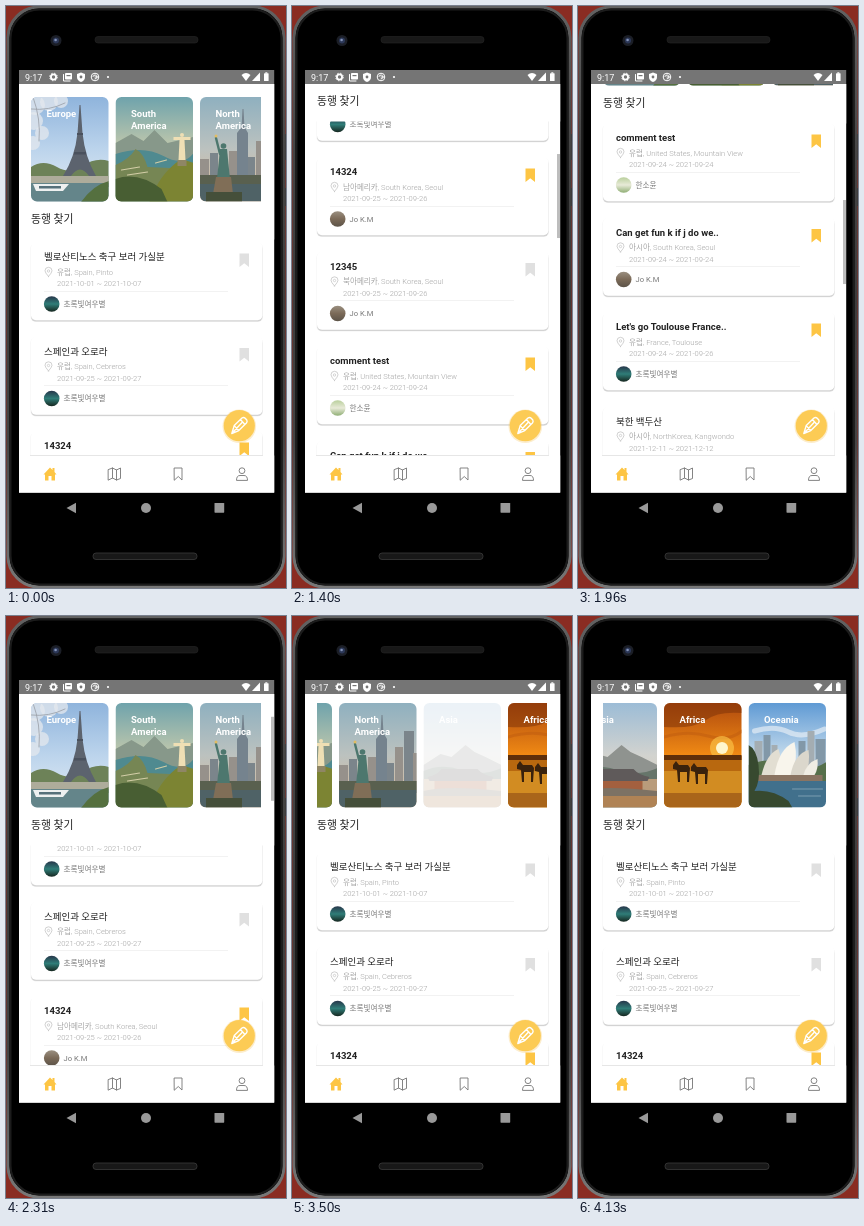
Animation of 280x582 px, one loop 4970 ms. Source, as an HTML page:

```html
<!DOCTYPE html>
<html lang="ko">
<head>
<meta charset="utf-8">
<style>
html, body { margin: 0; width: 100%; height: 100%; overflow: hidden; background: #8a2c22; }
svg { display: block; }
text { font-family: Roboto, "Noto Sans CJK KR", sans-serif; white-space: pre; }
</style>
</head>
<body>
<svg id="stage" width="280" height="582" viewBox="0 0 280 582"></svg>
<script>
const PITCH = 94.5, CARD_STEP = 84.5, LOOP = 4970, TICK = 70;

const text = (x, mid, size, fill, str, extra = '') =>
  `<text x="${x}" y="${mid + size * 0.36}" font-size="${size}" fill="${fill}" ${extra}>${str}</text>`;
const rect = (x, y, w, h, fill, extra = '') =>
  `<rect x="${x}" y="${y}" width="${w}" height="${h}" fill="${fill}" ${extra}/>`;
const circle = (x, y, r, fill, extra = '') =>
  `<circle cx="${x}" cy="${y}" r="${r}" fill="${fill}" ${extra}/>`;
const path = (d, fill, extra = '') => `<path d="${d}" fill="${fill}" ${extra}/>`;
const line = (d, color, width = 1, extra = '') =>
  path(d, 'none', `stroke="${color}" stroke-width="${width}" stroke-linejoin="round" stroke-linecap="round" ${extra}`);
const grad = (id, ...stops) => `<linearGradient id="${id}" x2="0" y2="1">` + stops.map((c, i) =>
  `<stop offset="${i / (stops.length - 1)}" stop-color="${c}"/>`).join('') + '</linearGradient>';
const full = fill => rect(0, 0, 78, 105, fill);

const defs = `<defs>
  <clipPath id="photo"><rect width="77.5" height="104.5" rx="6"/></clipPath>
  ${grad('rim', '#626262', '#444', '#3c3c3c', '#444', '#787878')}
  ${grad('skyEurope', '#8fb4dc', '#bcd4ec', '#e6edf4')}
  ${grad('skySouth', '#6fa3ac', '#c3c9ac', '#e0cd8f')}
  ${grad('skyNorth', '#8fb0bf', '#bcc2bf', '#dcb994')}
  ${grad('skyAsia', '#9cbcd6', '#d2d3cf', '#dccbb4')}
  ${grad('skyAfrica', '#b04a0e', '#f08a14', '#f4a325')}
  ${grad('skyOceania', '#5f9ad4', '#c3daec', '#dbe6ec')}
  ${grad('user0', '#27364a', '#2f7d78', '#16261f')}
  ${grad('user1', '#9a8f80', '#7b6a58', '#5c5348')}
  ${grad('user2', '#b9cf9c', '#e8ead8', '#8fae74')}
</defs>`;

const places = [
  ['Europe', full('url(#skyEurope)') +
    [[4, 8, 10], [18, 5, 9], [3, 24, 9], [30, 4, 7], [11, 36, 7], [2, 46, 7]].map(([x, y, r]) =>
      circle(x, y, r, '#e4e8ee', 'opacity=".75"')).join('') +
    line('M0 12Q18 14 34 6M2 0Q10 22 8 44', '#9a9fa6', 0.8) +
    path('M0 70Q12 62 26 70T52 69T78 64V90H0Z', '#6d8258') +
    path('M48.5 8H49.5L51.5 36Q54 60 65 79H58Q49 66 40 79H32Q44 60 46.5 36Z', '#5c636e') +
    rect(43, 55, 12, 2.5, '#4a515d') + rect(46, 36, 6, 2, '#4a515d') +
    rect(0, 79, 78, 7, '#aeac9b') + rect(0, 86, 78, 19, '#64858a') +
    path('M2 87H38L32 94H5Z', '#eef0f0') + rect(8, 89, 22, 2.5, '#56707a') +
    path('M78 84Q62 88 50 105H78Z', '#55703f')],
  ['South<tspan x="15.5" dy="12">America</tspan>', full('url(#skySouth)') +
    path('M0 46L16 37 28 44 39 33 52 46 78 40V105H0Z', '#87988a') +
    path('M0 57Q28 48 48 59T78 56V105H0Z', '#4f8a90') +
    path('M0 68Q14 62 20 52Q28 56 32 70L78 72V105H0Z', '#768654') +
    path('M34 105Q44 76 66 62L78 66V105Z', '#7c8433') + path('M0 82Q22 74 46 92L52 105H0Z', '#485e33') +
    line('M6 73L24 70M12 78L32 75M40 66L51 63', '#d2cda6', 1.2) +
    path('M58 40H75V43H69L70 63H63L64 43H58Z', '#efdfb4') + circle(66.5, 38, 2, '#efdfb4') +
    rect(62, 63, 9, 6, '#8f8665')],
  ['North<tspan x="15.5" dy="12">America</tspan>', full('url(#skyNorth)') +
    [[0, 62, 9], [10, 56, 8], [29, 54, 8], [47, 60, 8], [56, 44, 8], [65, 28, 10], [74, 50, 5]].map(([x, y, w], i) =>
      rect(x, y, w, 90 - y, i % 2 ? '#7b858b' : '#96918b')).join('') +
    path('M42.5 12H43.5L44.5 30 48 36V88H37V36L41.5 30Z', '#75838e') +
    rect(0, 78, 78, 9, '#59604f') + rect(0, 87, 78, 18, '#4f6266') +
    path('M20 52H27L30 82H17Z', '#4d776e') + circle(23.5, 49, 2.8, '#4d776e') +
    line('M20 57L16 41', '#4d776e', 2.4) + circle(16, 39, 1.5, '#e2bd62') +
    path('M16 80H31L33 97H13Z', '#806e57') + rect(6, 95, 36, 10, '#454f3a')],
  ['Asia', full('url(#skyAsia)') +
    path('M0 62L17 51 28 54 42 42 51 49 62 54 78 62V105H0Z', '#8f938f') +
    path('M0 68Q18 60 38 67T78 65V105H0Z', '#66756a') +
    rect(0, 76, 78, 29, '#b99c7b') +
    path('M4 74Q14 72 18 66H54Q59 72 70 74L68 78H6Z', '#5f5a5a') + rect(11, 78, 52, 10, '#a3603f') +
    path('M0 88Q24 82 78 88V93H0Z', '#7d7264') + rect(0, 93, 78, 12, '#b08355')],
  ['Africa', full('url(#skyAfrica)') +
    path('M0 0H78V10Q54 8 42 17T0 24Z', '#7a3008', 'opacity=".5"') +
    line('M0 34Q24 27 44 33T78 28', '#c4600f', 3, 'opacity=".6"') +
    circle(58, 45, 12, '#ffcb4e', 'opacity=".6"') + circle(58, 45, 6, '#fff6cc') +
    rect(0, 53, 78, 52, '#b8680f') + rect(0, 52, 78, 5, '#5e2f0a') +
    rect(0, 68, 78, 22, '#d28c22') + rect(0, 90, 78, 15, '#a9651a') +
    [[9, 60], [27, 62]].map(([x, y]) =>
      path(`M${x} ${y + 2}l3 -4 3 4h9l2 3 -1 14h-2v-10h-7v10h-2l-1 -12 -4 -1z`, '#3a220c')).join('')],
  ['Oceania', full('url(#skyOceania)') +
    line('M6 28Q26 22 40 29T76 26', '#f2f6f9', 5, 'opacity=".6"') +
    [[6, 38, 8], [15, 32, 7], [23, 42, 6], [50, 38, 7], [59, 28, 7], [67, 36, 10]].map(([x, y, w], i) =>
      rect(x, y, w, 76 - y, i % 2 ? '#8298a8' : '#a4adb2')).join('') +
    path('M0 62Q20 53 40 62T78 59V78H0Z', '#56704b') +
    path('M13 72Q18 51 30 46Q34 57 30 72Z', '#e2ded2') +
    path('M26 72Q30 46 46 39Q50 57 43 72Z', '#f8f5ec') +
    path('M42 72Q46 51 60 47Q62 60 57 72Z', '#dbd7cc') +
    path('M55 72Q58 60 69 56Q70 66 66 72Z', '#f0ede4') +
    rect(8, 72, 66, 6, '#8a7462') + rect(0, 78, 78, 27, '#41708c') +
    path('M0 42Q8 46 10 62T6 88Q24 86 40 98L44 105H0Z', '#37492f') + line('M44 86H74M50 93H72', '#7a9db0', 1)]
];

const users = ['초록빛여우별', 'Jo K.M', '한소윤'];
// title, place, from, to (month-day), user, bookmarked
const trips = [
  ['벨로산티노스 축구 보러 가실분', '유럽, Spain, Pinto', '10-01', '10-07', 0, 0],
  ['스페인과 오로라', '유럽, Spain, Cebreros', '09-25', '09-27', 0, 0],
  ['14324', '남아메리카, South Korea, Seoul', '09-25', '09-26', 1, 1],
  ['12345', '북아메리카, South Korea, Seoul', '09-25', '09-26', 1, 0],
  ['comment test', '유럽, United States, Mountain View', '09-24', '09-24', 2, 1],
  ['Can get fun k if j do we..', '아시아, South Korea, Seoul', '09-24', '09-24', 1, 1],
  ["Let's go Toulouse France..", '유럽, France, Toulouse', '09-24', '09-26', 0, 1],
  ['북한 백두산', '아시아, NorthKorea, Kangwondo', '12-11', '12-12', 0, 1]
];

const tripCard = ([title, place, from, to, user, saved], i) => `<g transform="translate(0 ${i * PITCH})">
  ${rect(24.5, 237, 232.5, 79, '#000', 'rx="5" opacity=".05"')}
  ${rect(25, 238, 231.5, 77.6, '#000', 'rx="5" opacity=".13"')}
  ${rect(25, 236, 231.5, 78.3, '#fff', 'rx="5"')}
  ${text(38, 251, 9.5, '#222', title, `font-weight="${/[가-힣]/.test(title) ? 500 : 700}"`)}
  ${line('M42.5 270.5Q39 266.5 39 264.8A3.5 3.5 0 0 1 46 264.8Q46 266.5 42.5 270.5Z', '#bdbdbd', 0.7)}
  ${circle(42.5, 265, 1.2, 'none', 'stroke="#bdbdbd" stroke-width=".6"')}
  ${text(51, 266, 7.55, '#a4a4a4', place, 'font-weight="300"')}
  ${text(51, 277.5, 7.55, '#a4a4a4', `2021-${from} ~ 2021-${to}`, 'font-weight="300"')}
  ${rect(38, 285, 184, 0.5, '#e4e4e4')}
  ${circle(45.7, 298, 7.8, `url(#user${user})`)}
  ${text(57.5, 298, 7.6, '#777', users[user])}
  ${path('M233.5 247.5h9.5v13.5l-4.75 -3.8l-4.75 3.8z', saved ? '#fdc544' : '#e0e0e0')}
</g>`;

const photoCard = ([name, scene], i) => `<g class="photo" transform="translate(${i * CARD_STEP} 0)">
  <g clip-path="url(#photo)">${scene}</g>
  ${text(15.5, 17, 9.5, '#fff', name, 'font-weight="700"')}
</g>`;

const phone =
  rect(0, 0, 280, 582, '#8a2c22') +
  rect(276, 128, 4, 26, '#3a3535') + rect(276, 182, 4, 18, '#3a3535') +
  rect(2, 1, 276, 580, '#000', 'rx="31" stroke="url(#rim)" stroke-width="3"') +
  rect(4.5, 3.5, 271, 575, '#000', 'rx="29" stroke="#1c1c1c" stroke-width="2"') +
  rect(89, 30.5, 103, 6.5, '#181818', 'rx="3" stroke="#262626" stroke-width=".6"') +
  rect(87, 547, 104, 6.5, '#181818', 'rx="3" stroke="#3b3b3b" stroke-width=".8"') +
  circle(50, 34.5, 5.5, '#1b1e26') + circle(50, 34.5, 3, '#2c3858') + circle(49.6, 34, 1.3, '#8493b8') +
  rect(13, 78, 255.2, 408.6, '#fff');

const statusBar =
  rect(13, 64, 255.2, 14, '#757575') +
  text(19, 71.5, 9, '#fff', '9:17') +
  circle(47.5, 71, 2.6, 'none', 'stroke="#fff" stroke-width="1.8"') +
  circle(47.5, 71, 3.8, 'none', 'stroke="#fff" stroke-width="1" stroke-dasharray="1.5 1.5"') +
  line('M57.5 68.5V75H64', '#fff', 1) + rect(59, 67, 7, 6.5, '#fff', 'rx=".8"') +
  rect(60.5, 69, 4, 1.2, '#757575') +
  path('M75 66.5L79 68V71Q79 74.5 75 76Q71 74.5 71 71V68Z', '#fff') + circle(75, 71, 1.4, '#757575') +
  circle(89, 71, 3.8, 'none', 'stroke="#fff" stroke-width="1"') +
  line('M87 70.5A2 2 0 1 1 89 73M89 71H92', '#fff', 1) +
  circle(102, 71, 1.1, '#fff') +
  path('M235.5 69Q240 65 244.5 69L240 75Z', '#fff') +
  path('M254 66.5V75H246Z', '#fff') +
  rect(258, 67.2, 4.6, 7.8, '#fff', 'rx=".6"') + rect(259.3, 66.3, 2, 1.2, '#fff');

const tabs =
  rect(13, 449.5, 255.2, 37.1, '#fff') + rect(24, 449, 233, 0.8, '#e0e0e0') +
  path('M37.5 468.5L44 461.5L46.5 464V462H48.5V466L50.5 468.5H49V474.5H45.5V470H42.5V474.5H39V468.5Z', '#fdc544') +
  line('M102.5 463.5L106.5 462L110.5 464L114.5 462V472.5L110.5 474L106.5 472L102.5 474ZM106.5 462V472M110.5 464V474', '#777', 0.9) +
  line('M168.5 462H176V474L172.25 470.5L168.5 474Z', '#777', 0.9) +
  circle(236, 464.7, 2.9, 'none', 'stroke="#777" stroke-width=".9"') +
  line('M230.5 474Q230.5 469.5 234 469.5H238Q241.5 469.5 241.5 474Z', '#777', 0.9);

const pencil =
  circle(233.3, 420.3, 16.8, '#f3c45a', 'opacity=".3"') + circle(233.3, 419.7, 15.6, '#fccb55') +
  line('M225.8 427.5L228.2 419.6L236 412Q237.7 410.8 239.2 412.2L240.8 414Q241.6 415.6 240.4 417L232.8 424.6ZM234.4 413.6L238.9 418.4M228.2 419.6L232.8 424.6M225.8 427.5L236.5 416', '#fff', 1.4);

const navKeys =
  path('M60.5 502L70 496.8V507.2Z', '#999') + circle(140, 502, 5, '#999') +
  rect(208.5, 497, 9.7, 9.7, '#999', 'rx=".6"');

stage.innerHTML = defs + phone +
  `<svg x="0" y="78" width="268.200" height="371" viewBox="0 78 268.200 371">
    <g id="list">${trips.map(tripCard).join('')}</g>
    <g id="head">${rect(13, 64, 256, 169.5, '#fff')}
      <svg x="25" y="91" width="230" height="104.500"><g id="strip">${places.map(photoCard).join('')}</g></svg>
      ${text(25, 213.4, 10.8, '#222', '동행 찾기')}
    </g>
    ${rect(265, 0, 3, 84, '#bdbdbd', 'id="thumb"')}
  </svg>` + tabs + pencil + statusBar + navKeys;

const photos = document.querySelectorAll('.photo');

// Linear interpolation through [time, value] points.
function track(points, t) {
  const i = points.findIndex(p => p[0] > t);
  if (i < 0) return points[points.length - 1][1];
  if (i === 0) return points[0][1];
  const [t0, a] = points[i - 1], [t1, b] = points[i];
  return a + (b - a) * (t - t0) / (t1 - t0);
}

const scrollKeys = [[980, 0], [1050, 22], [1120, 85], [1260, 203], [1400, 274], [1540, 312], [1610, 330],
  [1680, 385], [1820, 465], [1890, 499], [1960, 497], [2030, 440], [2240, 130], [2310, 45], [2380, 0]];
const headKeys = [[1050, 0], [1190, -118], [1890, -118], [1960, -116], [2030, -75], [2100, -20], [2170, -4]];
const stripKeys = [[2870, 0], [2940, 52], [3010, 80], [3080, 98], [3150, 108], [3290, 113], [3430, 113],
  [3500, 147], [3570, 180], [3640, 205], [3710, 220], [3850, 230], [3990, 230], [4060, 262], [4130, 277]];

// A touched photo dims at once, then fades back.
const pressed = (t, at) => track([[at - TICK, 1], [at, 0.2], [at + 70, 0.2], [at + 280, 1]], t);
const move = (el, x, y) => el.setAttribute('transform', `translate(${x} ${y})`);

const list = document.getElementById('list'), head = document.getElementById('head');
const strip = document.getElementById('strip'), thumb = document.getElementById('thumb');
const start = performance.now();

function draw() {
  const t = Math.floor((performance.now() - start) % LOOP / TICK) * TICK;
  const scroll = track(scrollKeys, t);
  move(list, 0, -scroll);
  move(head, 0, track(headKeys, t));
  move(strip, -track(stripKeys, t), 0);
  thumb.setAttribute('y', 91.5 + scroll * 0.2063);
  thumb.setAttribute('opacity', t > 1050 && t < 2380 ? 1 : 0);
  photos[2].setAttribute('opacity', pressed(t, 2940));
  photos[3].setAttribute('opacity', pressed(t, 3500));
  requestAnimationFrame(draw);
}
draw();
</script>
</body>
</html>
```
